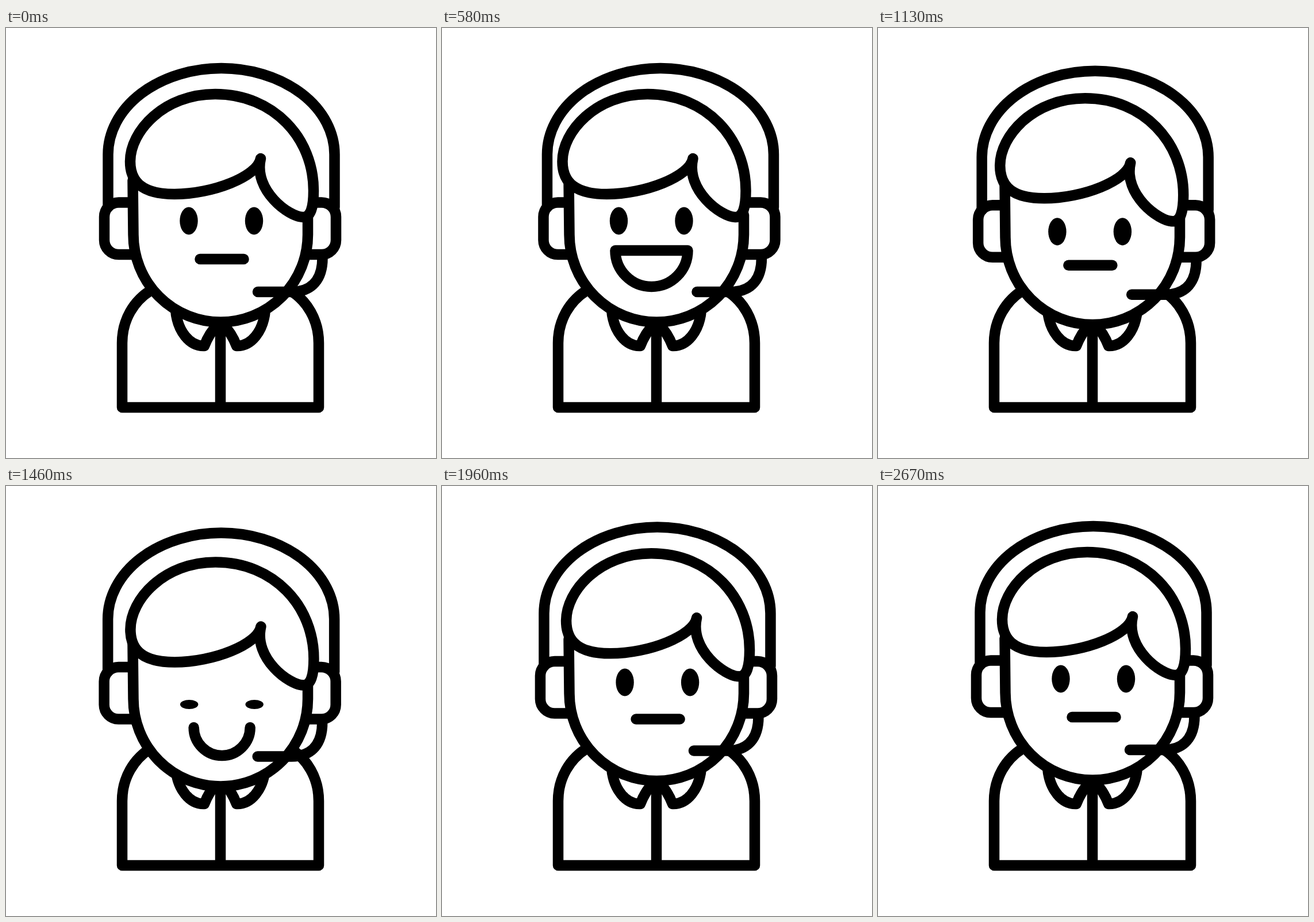
Write an HTML page that moves like this. It is 748 px wide and 748 px high and loops after 2.75 s.

```html
<!DOCTYPE html>
<html lang="en">
<head>
<meta charset="utf-8">
<title>Support agent</title>
<style>
  html, body { margin: 0; height: 100%; overflow: hidden; background: #fff; }
  svg { display: block; width: 100vw; height: 100vh; }
  .line { fill: none; stroke: #000; stroke-width: 18.5; stroke-linecap: round; stroke-linejoin: round; }
  .solid { fill: #fff; }
</style>
</head>
<body>
<svg viewBox="0 0 748 748">
  <g class="line">
    <path d="M254 455C222 474 202 508 202 548V660H544V548C544 508 524 474 492 455M373 515V660"/>
    <path id="collar" d="M295 490C298 528 320 554 345 553C350 540 357 527 367 518"/>
    <use href="#collar" transform="matrix(-1 0 0 1 746 0)"/>
    <g id="headset">
      <path d="M177.5 312V220A197 150 0 0 1 571.5 220V312"/>
      <path d="M222 303.5H196A25 25 0 0 0 171 328.5V369A25 25 0 0 0 196 394H222"/>
      <path d="M526 303.5H549A25 25 0 0 1 574 328.5V369A25 25 0 0 1 549 394H524"/>
    </g>
    <path id="face" class="solid" d="M220.5 265L221.5 359.5A151.75 152 0 0 0 525 359.5V325"/>
    <path id="hair" class="solid" d="M443 227C438 258 360 289 293 289C240 289 216 270 216 232C216 180 274 115 364 115C466 115 535 192 535 283C535 312 530 329 517 329C492 329 430 282 443 227Z"/>
    <path id="mic" d="M438 459H497C533 459 550.5 436 550.5 400"/>
    <path id="mouth"/>
  </g>
  <g id="eyes">
    <ellipse cx="318" cy="335.5" rx="15.7"/>
    <ellipse cx="431.5" cy="335.5" rx="15.7"/>
  </g>
</svg>
<script>
const LOOP = 2750, STEP = 1000 / 24;
const FLAT = 'M337.5 402H413.5';
const SMILE = 'M326 394.5A49 49 0 0 0 424 394.5';
const OPEN = 'M312 387H438A63 63 0 0 1 312 387Z';
const $ = id => document.getElementById(id);

function ease(k, from, to) {
  const s = Math.min(1, Math.max(0, (k - from) / (to - from)));
  return s * s * (3 - 2 * s);
}

// Lids close over three steps around the middle, then reopen.
const blink = (k, mid) => 0.9 * (1 - ease(Math.abs(k - mid), 0, 3));

function move(id, x, y) {
  $(id).setAttribute('transform', `translate(${x} ${y})`);
}

function mouthAt(k) {
  if ((k >= 8 && k < 24) || (k >= 56 && k < 64)) return OPEN;
  return k >= 30 && k < 38 ? SMILE : FLAT;
}

function draw(time) {
  const k = Math.floor((time % LOOP + 5) / STEP);
  const down = ease(k, 21.2, 34.2), back = ease(k, 37, 50);
  const turn = -ease(k, 0, 16) + 1.06 * down - 0.06 * back;
  const nod = down - back;

  for (const id of ['headset', 'mic']) move(id, -5.7 * turn, 11.5 * nod);
  move('face', 0, 11 * nod);
  move('hair', 6.8 * turn, 17.5 * nod);
  move('mouth', 11 * turn, 25.5 * nod);
  move('eyes', 11 * turn, 44.5 * nod);

  $('mouth').setAttribute('d', mouthAt(k));
  const lid = 1 - blink(k, 18) - blink(k, 34) - blink(k, 58);
  for (const eye of $('eyes').children) eye.setAttribute('ry', 24 * lid);
}

const start = performance.now();
function tick() {
  draw(performance.now() - start);
  requestAnimationFrame(tick);
}
tick();
</script>
</body>
</html>
```
